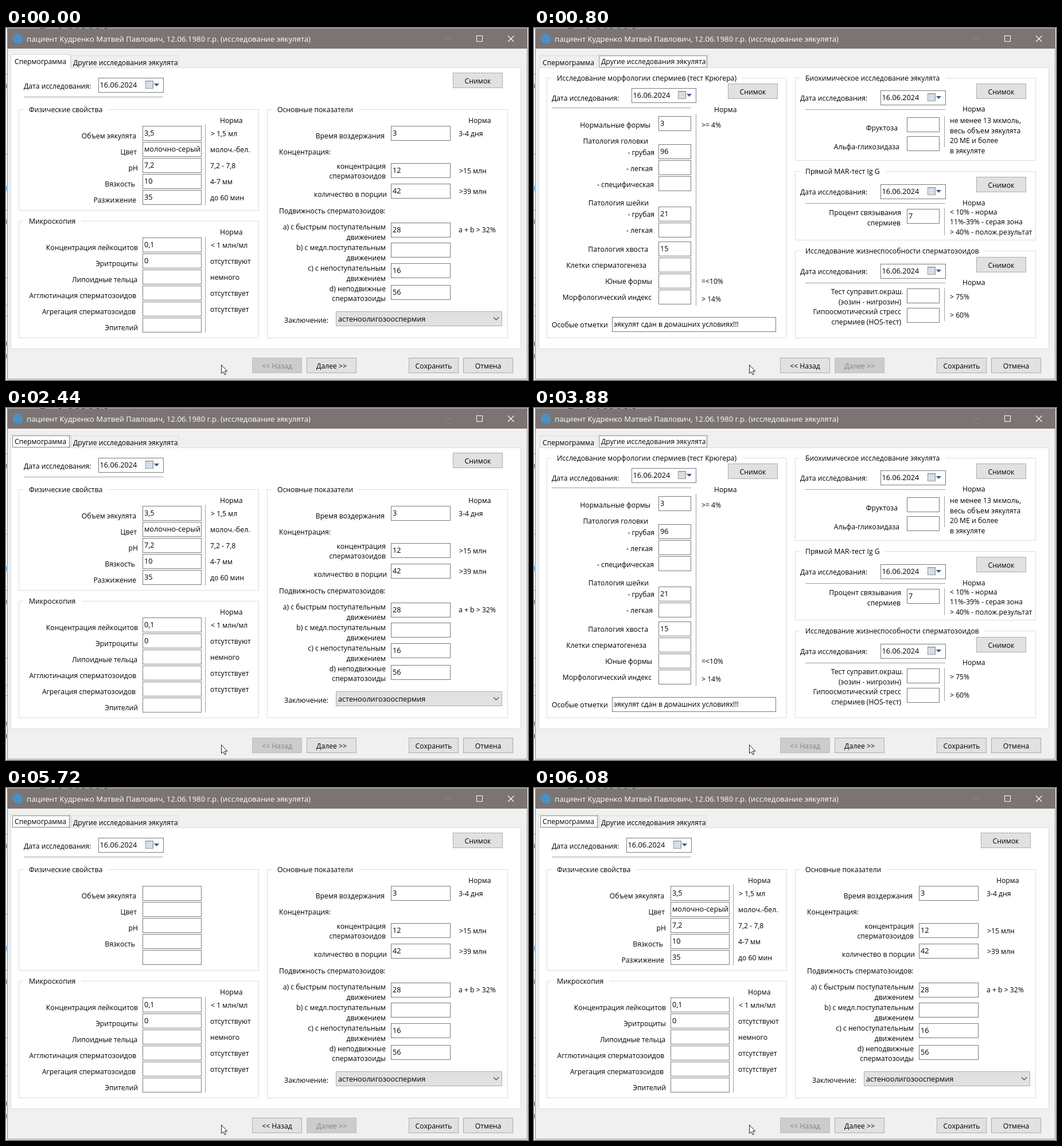
An HTML page with a canvas that plays this animation: 910x615 px, repeating every 6.16 s.

```html
<!DOCTYPE html>
<html lang="ru">
<head>
<meta charset="utf-8">
<title>Спермограмма</title>
<style>
html, body { margin: 0; width: 100%; height: 100%; overflow: hidden; background: #f0f0f0; }
canvas { display: block; }
</style>
</head>
<body>
<canvas id="stage" width="910" height="615"></canvas>
<script>
const ctx = document.getElementById('stage').getContext('2d');
const LOOP = 6160;
const font = size => `${size}px "Open Sans", "Noto Sans", sans-serif`;
const LABEL = font(12.2), VALUE = font(12.7), TITLE = font(13.2);
const LINE = '#a0a0a0', FRAME = '#dcdcdc', EDGE = '#7a7a7a';

// Each page switch: page shown and the moments at which the buttons repaint.
const switches = [
  { page: 2, at: [360, 400, 480, 560, 640, 720, 800] },
  { page: 1, at: [2080, 2120, 2200, 2280, 2360, 2440] },
  { page: 2, at: [3880, 3920, 4000, 4080, 4160, 4240] },
  { page: 1, at: [5720, 5800, 5880, 5960, 6040, 6080], partial: true }
];

function fill(x, y, w, h, color) {
  ctx.fillStyle = color;
  ctx.fillRect(x, y, w, h);
}

// Box with inclusive pixel edges.
function box(x0, y0, x1, y1, edge, inside) {
  if (inside) fill(x0, y0, x1 - x0 + 1, y1 - y0 + 1, inside);
  ctx.strokeStyle = edge;
  ctx.lineWidth = 1;
  ctx.strokeRect(x0 + .5, y0 + .5, x1 - x0, y1 - y0);
}

function path(points, color, width) {
  ctx.beginPath();
  points.forEach(([x, y]) => ctx.lineTo(x, y));
  if (width) {
    ctx.strokeStyle = color;
    ctx.lineWidth = width;
    ctx.stroke();
  } else {
    ctx.fillStyle = color;
    ctx.fill();
  }
}

// y is the middle of the capitals.
function text(s, x, y, { color = '#000', align = 'left', face = LABEL } = {}) {
  ctx.font = face;
  ctx.textAlign = align;
  ctx.fillStyle = color;
  ctx.fillText(s, x, y + 5);
}

const labels = list => list.forEach(([s, x, y]) => text(s, x, y));
const right = list => list.forEach(([s, x, y]) => text(s, x, y, { align: 'right' }));
const hline = (x0, x1, y) => fill(x0, y, x1 - x0, 1, LINE);
const vline = (x, y0, y1) => fill(x, y0, 1, y1 - y0, LINE);

function group(title, x0, y0, x1, y1) {
  box(x0, y0, x1, y1, FRAME);
  ctx.font = LABEL;
  fill(x0 + 8, y0, ctx.measureText(title).width + 20, 1, '#fff');
  text(title, x0 + 18, y0);
}

function input(x, y, w, value = '', face = VALUE) {
  box(x, y, x + w, y + 25, EDGE, '#fff');
  text(value, x + 3, y + 12, { face });
}

function inputs(x, w, rows) {
  rows.forEach(([y, value]) => input(x, y, w, value));
}

function button(label, x, y, off) {
  box(x, y, x + 86, y + 26, off ? '#bfbfbf' : '#adadad', off ? '#cccccc' : '#e1e1e1');
  text(label, x + 43.5, y + 14, { color: off ? '#838383' : '#000', align: 'center' });
}

// Cross-fades a button between its enabled and disabled look.
function fadeButton(label, x, y, on) {
  button(label, x, y, true);
  ctx.globalAlpha = on;
  button(label, x, y, false);
  ctx.globalAlpha = 1;
}

function date(x, y, w) {
  box(x, y, x + w, y + 25, EDGE, '#fff');
  text('16.06.2024', x + 2.5, y + 12, { face: VALUE });
  const cx = x + w - 31;
  box(cx, y + 5, cx + 13, y + 18, '#8a8f98', '#f4f5f7');
  fill(cx + 1, y + 6, 12, 2, '#c3c9d3');
  for (let r = 0; r < 3; r++)
    for (let c = 0; c < 4; c++) fill(cx + 2 + c * 3, y + 9 + r * 3, 2, 2, '#b9bec6');
  path([[cx + 15, y + 10], [cx + 24, y + 10], [cx + 19.5, y + 15]], '#38598c');
}

function focus(x0, y0, x1, y1) {
  for (let x = x0; x <= x1; x += 2) {
    fill(x, y0, 1, 1, '#000');
    fill(x, y1, 1, 1, '#000');
  }
  for (let y = y0; y <= y1; y += 2) {
    fill(x0, y, 1, 1, '#000');
    fill(x1, y, 1, 1, '#000');
  }
}

function desktop() {
  fill(0, 0, 910, 615, '#fff');
  fill(0, 0, 910, 1, '#b5b2b1');
  [60, 64, 92, 110, 122, 133, 146, 158, 172].forEach(x => fill(x, 0, 4, 1, '#444'));
  [98, 335, 548, 570].forEach(y => fill(0, y, 1, 7, '#333'));
  fill(0, 276, 1, 9, '#2a8ad8');
  [80, 220, 318, 436, 484, 502].forEach(y => fill(0, y, 2, 1, '#999'));
}

function frame() {
  fill(2, 1, 907, 613, '#f0f0f0');
  fill(2, 1, 907, 35, '#7b7472');
  fill(2, 36, 1, 578, '#8b8583');
  fill(908, 36, 1, 578, '#8b8583');
  fill(2, 613, 907, 1, '#8b8583');
  ctx.beginPath();
  ctx.arc(20.5, 18.5, 9, 0, 7);
  ctx.fillStyle = '#4d8fc4';
  ctx.fill();
  text('пациент Кудренко Матвей Павлович, 12.06.1980 г.р. (исследование эякулята)', 36, 19,
    { color: '#fff', face: TITLE });
  fill(766, 18, 11, 1, '#938d8b');
  box(820, 13, 830, 23, '#fff');
  path([[875, 13.5], [885.5, 24]], '#fff', 1.1);
  path([[885.5, 13.5], [875, 24]], '#fff', 1.1);
}

function tabs(page, focused) {
  const first = page === 1;
  box(8, 69, 897, 560, FRAME, '#fff');
  const draw = (x0, x1, on) => {
    box(x0, on ? 46 : 48, x1, 69, '#d9d9d9', on ? '#fff' : '#f0f0f0');
    if (on) fill(x0 + 1, 69, x1 - x0 - 1, 1, '#fff');
  };
  if (first) {
    draw(113, 300, false);
    draw(8, 112, true);
  } else {
    draw(10, 111, false);
    draw(110, 303, true);
  }
  text('Спермограмма', 15, first ? 58 : 60);
  text('Другие исследования эякулята', 117, first ? 60 : 58);
  if (focused) first ? focus(11, 48, 110, 68) : focus(113, 48, 301, 68);
}

function pageOne(partial) {
  text('Дата исследования:', 31, 101);
  date(161, 87, 113);
  hline(31, 274, 120);
  button('Снимок', 779, 78);

  group('Физические свойства', 22, 142, 440, 318);
  const values = ['3,5', 'молочно-серый', '7,2', '10', '35'];
  inputs(238, 102, values.map((v, i) => [171 + i * 28, partial ? '' : v]));
  right([['Объем эякулята', 227, 188], ['Цвет', 228, 216], ['pH', 230, 244], ['Вязкость', 225, 272]]);
  if (!partial) {
    right([['Разжижение', 227, 300]]);
    labels([['Норма', 373, 161], ['> 1,5 мл', 357, 184], ['молоч.-бел.', 356, 212],
      ['7,2 - 7,8', 356, 240], ['4-7 мм', 356, 268], ['до 60 мин', 356, 296]]);
    vline(347, 169, 310);
  }

  group('Микроскопия', 22, 337, 440, 541);
  inputs(238, 102, ['0,1', '0', '', '', '', ''].map((v, i) => [366 + i * 28, v]));
  right([['Концентрация лейкоцитов', 230, 383], ['Эритроциты', 230, 411], ['Липоидные тельца', 229, 439],
    ['Агглютинация сперматозоидов', 227, 467], ['Агрегация сперматозоидов', 226, 495], ['Эпителий', 230, 523]]);
  labels([['Норма', 373, 356], ['< 1 млн/мл', 357, 379], ['отсутствуют', 356, 407],
    ['немного', 356, 435], ['отсутствует', 356, 463], ['отсутствует', 356, 491]]);
  vline(347, 365, 532);

  group('Основные показатели', 455, 142, 874, 541);
  inputs(671, 103, [[171, '3'], [236, '12'], [272, '42'], [340, '28'], [375], [411, '16'], [449, '56']]);
  right([['Время воздержания', 660, 188], ['концентрация', 662, 241], ['сперматозоидов', 662, 258],
    ['количество в порции', 664, 290], ['a) с быстрым поступательным', 662, 347], ['движением', 662, 365],
    ['b) с медл.поступательным', 662, 383], ['движением', 662, 401], ['c) с непоступательным', 662, 419],
    ['движением', 662, 437], ['d) неподвижные', 662, 455], ['сперматозоиды', 662, 472], ['Заключение:', 562, 510]]);
  labels([['Норма', 806, 161], ['3-4 дня', 789, 184], ['Концентрация:', 476, 216], ['>15 млн', 790, 249],
    ['>39 млн', 790, 285], ['Подвижность сперматозоидов:', 476, 319], ['a + b > 32%', 789, 352]]);
  box(575, 495, 864, 520, '#adadad', '#e1e1e1');
  text('астеноолигозооспермия', 579, 508, { face: VALUE });
  path([[850, 505.5], [854.5, 510], [859, 505.5]], '#444', 1.1);
}

function pageTwo() {
  group('Исследование морфологии спермиев (тест Крюгера)', 22, 87, 440, 541);
  text('Дата исследования:', 31, 122);
  date(170, 105, 112);
  button('Снимок', 338, 97);
  hline(31, 274, 139);
  inputs(217, 56, [[154, '3'], [203, '96'], [231], [259], [312, '21'], [340], [373, '15'], [401], [429], [457]]);
  vline(282, 150, 485);
  right([['Нормальные формы', 203, 169], ['Патология головки', 199, 197], ['- грубая', 210, 217],
    ['- легкая', 207, 245], ['- специфическая', 209, 273], ['Патология шейки', 200, 305], ['- грубая', 210, 325],
    ['- легкая', 207, 353], ['Патология хвоста', 199, 386], ['Клетки сперматогенеза', 196, 414],
    ['Юные формы', 206, 442], ['Морфологический индекс', 205, 470]]);
  labels([['Норма', 314, 142], ['>= 4%', 292, 169], ['=<10%', 292, 442], ['> 14%', 292, 473],
    ['Особые отметки', 31, 518]]);
  input(136, 505, 285, 'эякулят сдан в домашних условиях!!!', LABEL);

  group('Биохимическое исследование эякулята', 455, 87, 874, 231);
  group('Прямой MAR-тест Ig G', 455, 250, 874, 370);
  group('Исследование жизнеспособности сперматозоидов', 455, 389, 874, 541);
  [[109, 97, 142], [273, 260, 306], [412, 400, 445]].forEach(([d, b, l]) => {
    text('Дата исследования:', 464, d + 13);
    date(604, d, 113);
    button('Снимок', 771, b);
    hline(473, 717, l);
    text('Норма', 747, l - 1);
  });
  inputs(650, 56, [[156], [189], [316, '7'], [455], [489]]);
  vline(715, 154, 208);
  vline(715, 315, 362);
  vline(715, 454, 512);
  right([['Фруктоза', 634, 174], ['Альфа-гликозидаза', 637, 207], ['Процент связывания', 640, 322],
    ['спермиев', 639, 340], ['Тест суправит.окраш.', 644, 460], ['(эозин - нигрозин)', 640, 478],
    ['Гипоосмотический стресс', 640, 495], ['спермиев (HOS-тест)', 640, 513]]);
  labels([['не менее 13 мкмоль,', 725, 161], ['весь объем эякулята', 725, 179], ['20 МЕ и более', 725, 196],
    ['в эякуляте', 725, 214], ['< 10% - норма', 725, 321], ['11%-39% - серая зона', 725, 338],
    ['> 40% - полож.результат', 725, 356], ['> 75%', 725, 469], ['> 60%', 725, 501]]);
}

function pointer() {
  const arrow = [[375.5, 588.5], [375.5, 603.5], [378.8, 600.5], [381.2, 605.8],
    [383.5, 604.8], [381.2, 599.6], [385.8, 599.4], [375.5, 588.5]];
  path(arrow, '#fff');
  path(arrow, '#222', 1);
}

function stateAt(t) {
  const s = { page: 1, back: 0, partial: false, focused: t >= switches[0].at[0] };
  for (const { page, at, partial } of switches) {
    const done = at.filter(x => x <= t).length;
    if (!done) break;
    const p = (done - 1) / (at.length - 1);
    s.page = page;
    s.back = page === 2 ? p : 1 - p;
    s.partial = !!partial && done === 1;
  }
  return s;
}

let shown = '';
function tick(now) {
  const s = stateAt(now % LOOP);
  const key = JSON.stringify(s);
  if (key !== shown) {
    shown = key;
    desktop();
    frame();
    tabs(s.page, s.focused);
    s.page === 1 ? pageOne(s.partial) : pageTwo();
    fadeButton('<< Назад', 429, 576, s.back);
    fadeButton('Далее >>', 524, 576, 1 - s.back);
    button('Сохранить', 702, 576);
    button('Отмена', 797, 576);
    pointer();
  }
  requestAnimationFrame(tick);
}

tick(0);
</script>
</body>
</html>
```
